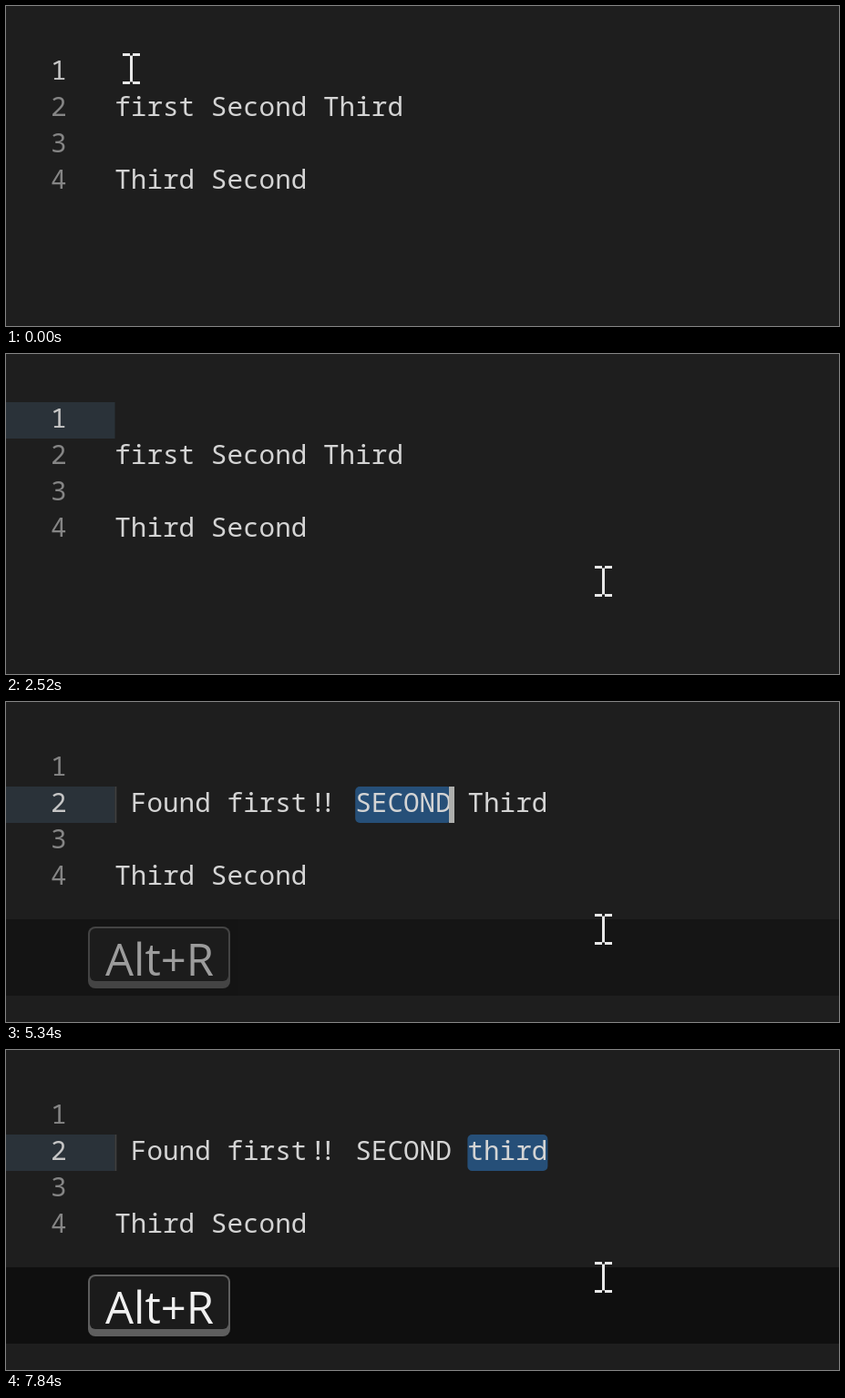
These frames come from a looping animation (914 by 352 pixels, 8 s). An HTML page:

```html
<!DOCTYPE html>
<html lang="en">
<head>
<meta charset="utf-8">
<style>
  html, body { margin: 0; width: 100%; height: 100%; overflow: hidden; background: #1e1e1e; }
  svg { display: block; width: 914px; height: 352px; }
  text { white-space: pre; fill: #d4d4d4; font: 29.33px "Noto Sans Mono", "DejaVu Sans Mono", monospace; }
  .num { fill: #858585; }
  .num.on { fill: #c6c6c6; }
  .tight { letter-spacing: -6.6px; }
  .key { fill: #f0f0f0; font: 49px "Open Sans", "Noto Sans", sans-serif; text-anchor: middle; }
</style>
</head>
<body>
<svg id="stage" viewBox="0 0 914 352"></svg>
<script>
const LOOP = 8000, COL = 17.6, LEFT = 119.2, ROW = 40, TOP = 53;
const CLICK = 1000, FLICK = 1510, TICK = 100;
const BLINK = 500, FADE = 200, KEY_TIME = 800;

// Each key press edits line 2 and selects the columns from..to.
const EDITS = [
  { at: 0,    press: CLICK, line: "first Second Third" },
  { at: 3120, press: 3020, line: " Found first!! Second Third", from: 0,  to: 14 },
  { at: 5230, press: 5220, line: " Found first!! SECOND Third", from: 15, to: 21 },
  { at: 7330, press: 7325, line: " Found first!! SECOND third", from: 22, to: 27 },
];

const colX = col => LEFT + COL * col;
const rowY = row => TOP + ROW * (row - 1);
const rect = (x, y, w, h, fill, r = 0) =>
  `<rect x="${x}" y="${y}" width="${w}" height="${h}" fill="${fill}" rx="${r}"/>`;
const text = (s, x, y, cls = "") => `<text x="${x}" y="${y}" class="${cls}">${s}</text>`;

function code(line, row) {
  const y = rowY(row) + 28;
  return [...line.matchAll(/\w+|!+/g)].map(({ 0: s, index }) =>
    s === "!!" ? text(s, colX(index) + 3, y, "tight") : text(s, colX(index), y)).join("");
}

function keycap(age) {
  if (age >= KEY_TIME) return "";
  return `<g opacity="${Math.min(1, age / FADE).toFixed(2)}">`
    + rect(0, 239, 914, 84, "rgba(0,0,0,.5)")
    + rect(90, 247, 156, 68, "#5e5e5e", 8)
    + rect(92, 249, 152, 58, "#1b1b1b", 6)
    + text("Alt+R", 168.5, 301, "key") + "</g>";
}

// The mouse nudges up after the click, then flicks away and swings to rest.
function mouseAt(t) {
  const steps = from => Math.floor((t - from) / TICK);
  if (t < FLICK) {
    const n = Math.min(2, Math.max(0, steps(CLICK)));
    const nudge = Math.sin(n * Math.PI / 2);
    return [137.5 + 10 * nudge, 69.5 - 9 * nudge];
  }
  const s = steps(FLICK);
  const swing = Math.exp(-1.5 * s) * Math.cos(1.2 * s);
  return [655.5 - Math.round(111 * swing), 250.5 - Math.round(44 * swing)];
}

const pointer = t =>
  `<path transform="translate(${mouseAt(t)})" fill="none" stroke="#e8e8e8" stroke-width="3"
    d="M-9.5-16H-1.5M1.5-16H9.5M0-15V14M-9.5 15H-1.5M1.5 15H9.5"/>`;

function draw(t) {
  const { at, press, line, from, to = 0 } = EDITS.findLast(e => t >= e.at);
  const edited = at > 0;
  const active = edited ? 2 : 1;
  const y = rowY(active);
  let out = "";

  if (t >= CLICK) out += rect(0, y, 119.5, ROW, "#2a3239");
  if (edited) {
    out += rect(colX(from), y, COL * (to - from), ROW, "#264f78", 5);
    out += rect(119.5, y, 1.8, ROW, "#404040");
  }
  for (let n = 1; n <= 4; n++) out += text(n, 49, rowY(n) + 28, n === active ? "num on" : "num");
  out += code(line, 2) + code("Third Second", 4);

  const caretOn = t >= press && Math.floor((t - press) / BLINK) % 2 === 0;
  if (caretOn) out += rect(Math.round(colX(to) - (edited ? 2.4 : 0)), y, 6, ROW, "#aeafad");
  if (edited) out += keycap(t - press);
  return out + pointer(t);
}

const stage = document.getElementById("stage");
const start = performance.now();
let last = "";
function tick() {
  const next = draw((performance.now() - start) % LOOP);
  if (next !== last) stage.innerHTML = last = next;
  requestAnimationFrame(tick);
}
tick();
</script>
</body>
</html>
```
